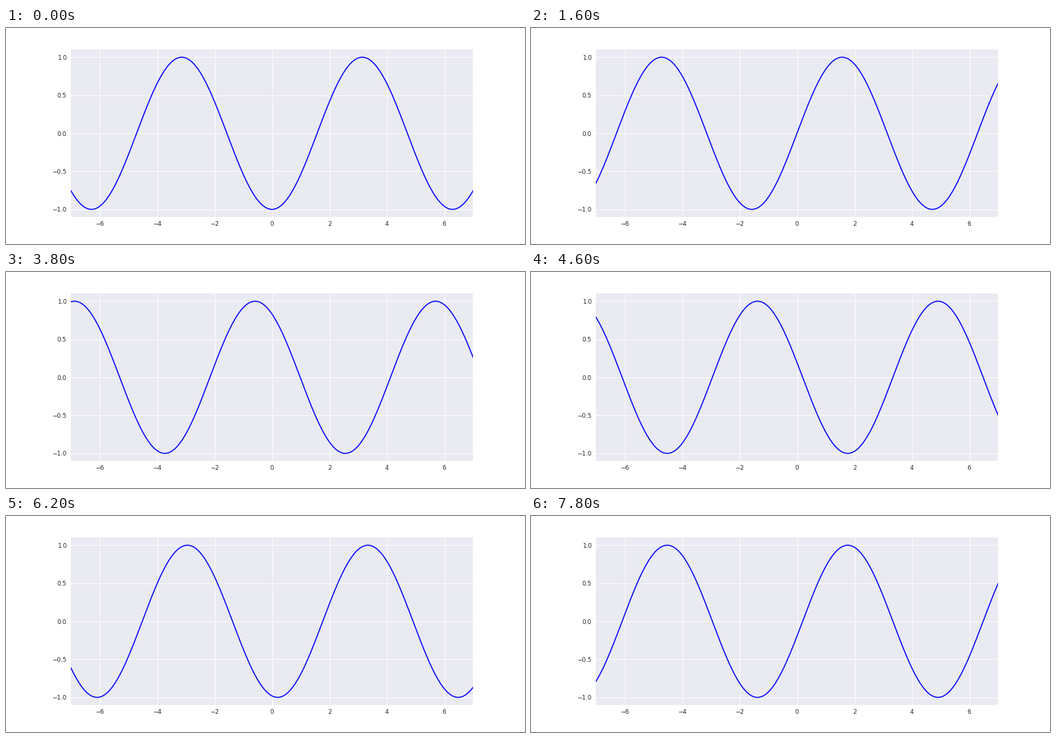
Recreate the animation shown at these times as a matplotlib script. Size 768x320 px, loop 8000 ms.

```python
import numpy as np
import matplotlib.pyplot as plt
from matplotlib.animation import FuncAnimation

FRAMES = 40
INTERVAL = 200
STEP = np.pi / 16  # phase advance per frame

plt.rcParams["font.family"] = "DejaVu Sans"
plt.rcParams["axes.unicode_minus"] = True

fig = plt.figure(figsize=(12, 5), dpi=64, facecolor="white")
ax = fig.add_axes([0.125, 0.125, 0.775, 0.775], facecolor="#eaeaf2")
ax.set_xlim(-7, 7)
ax.set_ylim(-1.1, 1.1)
ax.set_xticks(range(-6, 7, 2))
ax.set_yticks([-1.0, -0.5, 0.0, 0.5, 1.0])
ax.set_axisbelow(True)
ax.grid(True, color="white", linewidth=1, linestyle="-")
ax.tick_params(length=0, pad=7, labelsize=10, labelcolor="0.15")
for spine in ax.spines.values():
    spine.set_visible(False)

x = np.linspace(-7, 7, 200)
wave, = ax.plot(x, -np.cos(x), color="#0000ff", linewidth=1.75)


def update(frame):
    wave.set_ydata(-np.cos(x + frame * STEP))
    return wave,


anim = FuncAnimation(fig, update, frames=FRAMES, interval=INTERVAL,
                     repeat=True, repeat_delay=0)
plt.show()
```
